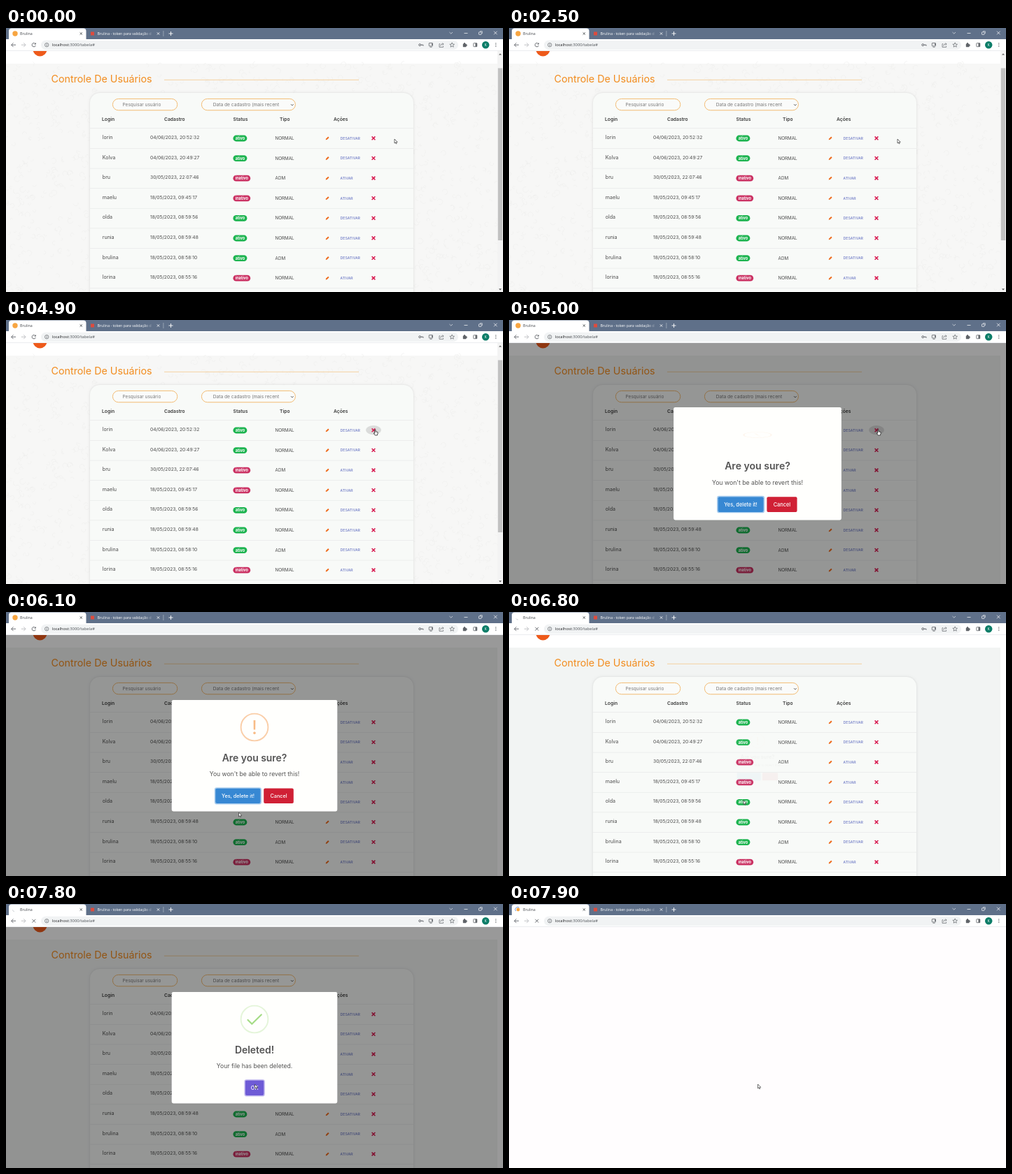
Write an HTML page with a canvas that moves like this. It is 710 px wide and 378 px high and loops after 8 s.

```html
<!DOCTYPE html>
<html lang="pt">
<head>
<meta charset="utf-8">
<title>Controle De Usuários</title>
<style>
html, body { margin: 0; width: 100%; height: 100%; overflow: hidden; background: #fff; }
canvas { display: block; width: 710px; height: 378px; }
</style>
</head>
<body>
<canvas id="stage"></canvas>
<script>
const W = 710, H = 378, LOOP = 8000;
const canvas = document.getElementById('stage');
const ratio = window.devicePixelRatio || 1;
canvas.width = W * ratio;
canvas.height = H * ratio;
const c = canvas.getContext('2d');

const UI = 'Inter, "Open Sans", sans-serif';
const SYS = '"Open Sans", "Noto Sans", sans-serif';
const ORANGE = '#f28c1e';

// Timeline in ms
const ASK_IN = 4918, ASK_OUT = 6690, DONE_IN = 6918, BLANK = 7850, LOADING = 6650;

const clamp = (v, a = 0, b = 1) => Math.min(b, Math.max(a, v));
const mix = (a, b, k) => a + (b - a) * k;
const smooth = k => k * k * (3 - 2 * k);

// CSS "ease": cubic-bezier(.25, .1, .25, 1)
function ease(x) {
  x = clamp(x);
  const bez = (a, b, s) => 3 * a * s * (1 - s) ** 2 + 3 * b * s * s * (1 - s) + s ** 3;
  let lo = 0, hi = 1;
  for (let i = 0; i < 20; i++) {
    const m = (lo + hi) / 2;
    if (bez(.25, .25, m) < x) lo = m; else hi = m;
  }
  return bez(.1, 1, lo);
}

// Interpolates stops of the form [time, ...values]
function track(stops, t, curve) {
  if (t <= stops[0][0]) return stops[0].slice(1);
  for (let i = 1; i < stops.length; i++) {
    const a = stops[i - 1], b = stops[i];
    if (t < b[0]) {
      const k = curve((t - a[0]) / (b[0] - a[0]));
      return a.slice(1).map((v, j) => mix(v, b[j + 1], k));
    }
  }
  return stops[stops.length - 1].slice(1);
}

function text(s, x, y, size, color, weight = 400, family = UI, align = 'left') {
  c.font = `${weight} ${size}px ${family}`;
  c.textAlign = align;
  c.fillStyle = color;
  c.fillText(s, x, y);
}

function rect(x, y, w, h, color) {
  c.fillStyle = color;
  c.fillRect(x, y, w, h);
}

function box(x, y, w, h, r, fill, line, lw = 1) {
  c.beginPath();
  c.roundRect(x, y, w, h, r);
  if (fill) { c.fillStyle = fill; c.fill(); }
  if (line) { c.strokeStyle = line; c.lineWidth = lw; c.stroke(); }
}

function disc(x, y, r, color) {
  c.beginPath();
  c.arc(x, y, r, 0, 7);
  c.fillStyle = color;
  c.fill();
}

function arc(x, y, r, a, b, color, lw) {
  c.beginPath();
  c.arc(x, y, r, a, b);
  c.strokeStyle = color;
  c.lineWidth = lw;
  c.stroke();
}

function poly(points, color, lw, fill) {
  c.beginPath();
  points.forEach(([x, y], i) => i ? c.lineTo(x, y) : c.moveTo(x, y));
  if (fill) { c.closePath(); c.fillStyle = fill; c.fill(); }
  if (color) { c.strokeStyle = color; c.lineWidth = lw; c.stroke(); }
}

function cross(x, y, r, color, lw) {
  poly([[x - r, y - r], [x + r, y + r]], color, lw);
  poly([[x + r, y - r], [x - r, y + r]], color, lw);
}

function star(x, y, r) {
  const pts = [];
  for (let i = 0; i <= 10; i++) {
    const a = -Math.PI / 2 + i * Math.PI / 5, q = i % 2 ? r * .45 : r;
    pts.push([x + q * Math.cos(a), y + q * Math.sin(a)]);
  }
  poly(pts, '#5f6368', .7);
}

function tabs(t) {
  rect(0, 0, W, 16, '#5f7089');
  box(4, .5, 110.5, 18, [4, 4, 0, 0], '#fff');
  if (t < LOADING) disc(13, 8, 3.7, '#f7a541');
  else if (t < BLANK) arc(12.5, 8, 3, t / 150, t / 150 + 1.3, '#c3c7cc', .8);
  else {
    disc(13, 8, 2.4, '#f7a541');
    arc(12.5, 8, 3.6, 1.6 + t / 400, 4.4 + t / 400, '#4c7fd6', .8);
  }
  text('Brulina', 20, 10, 5.3, '#45484d', 400, SYS);
  cross(107.3, 8, 1.7, '#3c4043', .8);
  rect(121, 5.5, 5, 5, '#dd4b3e');
  const fade = c.createLinearGradient(198, 0, 212, 0);
  fade.addColorStop(0, '#fff');
  fade.addColorStop(1, 'rgba(255,255,255,0)');
  text('Brulina - token para validação d', 130.5, 10, 5.25, fade, 400, SYS);
  cross(217.5, 8, 1.7, '#fff', .8);
  rect(224.5, 4, .8, 8, '#a3aebd');
  poly([[232.5, 8], [238.5, 8]], '#fff', .9);
  poly([[235.5, 5], [235.5, 11]], '#fff', .9);
  poly([[633.5, 6], [635.8, 8.2], [638, 6]], '#e8ebf0', .7);
  poly([[654.5, 7.5], [659.5, 7.5]], '#fff', .7);
  box(675.5, 5.8, 3.6, 3.6, .6, null, '#fff', .7);
  poly([[677, 4.7], [680.3, 4.7], [680.3, 8]], '#fff', .6);
  cross(699.3, 7, 2.3, '#fff', .7);
}

function toolbar(t) {
  const ink = '#5f6368';
  rect(0, 16, W, 17, '#fff');
  box(50, 17.7, 596, 13.2, 6.6, '#f1f3f4');
  poly([[14, 24.2], [7.6, 24.2]], ink, .9);
  poly([[10.5, 21.3], [7.6, 24.2], [10.5, 27.1]], ink, .9);
  poly([[21.8, 24.2], [28, 24.2]], '#babcc0', .9);
  poly([[25.2, 21.3], [28, 24.2], [25.2, 27.1]], '#babcc0', .9);
  if (t < LOADING) {
    arc(39.8, 24.2, 2.7, .3, 5.5, ink, .9);
    poly([[42.8, 21], [42.8, 23.6], [40.2, 23.6]], null, 0, ink);
  } else cross(39.8, 24.2, 2.4, ink, .9);
  arc(58.2, 24.2, 2.7, 0, 7, ink, .7);
  rect(57.8, 23.7, .8, 2, ink);
  rect(57.8, 22.5, .8, .8, ink);
  text('localhost', 65.7, 26.4, 5.75, '#202124', 400, SYS);
  const x = 65.7 + c.measureText('localhost').width;
  text(':3000/tabela#', x, 26.4, 5.75, '#4d5156', 400, SYS);
  if (t < BLANK) {
    arc(591.2, 24.2, 1.4, 0, 7, ink, 1);
    poly([[592.6, 24.2], [596, 24.2], [596, 25.6]], ink, 1);
  }
  box(604.3, 21.5, 5.2, 4.4, .5, null, ink, .8);
  rect(605.5, 26.8, 3, .8, ink);
  poly([[608, 22], [608, 25], [609.8, 23.6]], null, 0, ink);
  poly([[620.2, 22.7], [619, 22.7], [619, 27.4], [624.6, 27.4], [624.6, 25.7]], ink, .7);
  poly([[620.6, 25.7], [622, 23], [625, 23]], ink, .7);
  poly([[623.6, 21.4], [625.2, 23], [623.6, 24.6]], ink, .7);
  star(637.2, 24.4, 3.5);
  box(652.8, 22.4, 4.8, 4.8, .6, ink);
  disc(655, 22.2, 1.1, ink);
  disc(657.8, 24.7, 1.1, ink);
  box(667.8, 21.7, 5, 5, .5, null, ink, .8);
  rect(670.5, 21.7, 2.3, 5, ink);
  disc(685.2, 24.2, 5.2, '#0c7d68');
  text('K', 685.2, 26.2, 5.2, '#fff', 400, SYS, 'center');
  for (let i = -1; i < 2; i++) disc(699.8, 24.2 + i * 2.2, .65, ink);
  rect(0, 32.3, W, .7, '#e3e5e8');
}

// Faint doodle wallpaper
const doodles = (() => {
  let seed = 7;
  const rnd = () => (seed = seed * 16807 % 2147483647) / 2147483647;
  return Array.from({ length: 1500 }, () =>
    [rnd() * 702, 51 + rnd() * 327, 1.5 + rnd() * 2.5, rnd() * 6, 2 + rnd() * 3]);
})();

function wallpaper() {
  rect(0, 51, 702, H - 51, '#f7f7f6');
  c.beginPath();
  for (const [x, y, r, a, len] of doodles) {
    c.moveTo(x + r * Math.cos(a), y + r * Math.sin(a));
    c.arc(x, y, r, a, a + len);
  }
  c.strokeStyle = '#efefee';
  c.lineWidth = .7;
  c.stroke();
}

const rows = [
  ['lorin', '04/06/2023, 20:52:32', 1, 'NORMAL'],
  ['Kolva', '04/06/2023, 20:49:27', 1, 'NORMAL'],
  ['bru', '30/05/2023, 22:07:46', 0, 'ADM'],
  ['maelu', '18/05/2023, 09:45:17', 0, 'NORMAL'],
  ['olda', '18/05/2023, 08:59:56', 1, 'NORMAL'],
  ['runia', '18/05/2023, 08:59:48', 1, 'NORMAL'],
  ['brulina', '18/05/2023, 08:58:10', 1, 'ADM'],
  ['lorina', '18/05/2023, 08:55:16', 0, 'NORMAL']
];

function row([name, date, on, kind], i) {
  const y = 157.8 + i * 28.6;
  text(name, 137.8, y + 1.2, 7.1, '#4a4a4a');
  text(date, 206, y + 1.1, 6.7, '#4a4a4a');
  box(324.4, y - 4.2, on ? 20 : 24.8, 8.8, 4.4, on ? '#1db450' : '#cb3364');
  text(on ? 'ativo' : 'inativo', on ? 334.4 : 336.8, y + 2.1, 5.5, '#fff', 700, UI, 'center');
  text(kind, 384.6, y + 2.2, 6.25, '#4a4a4a');
  poly([[456.7, y + 2.5], [457.2, y + .6], [460.2, y - 2.3], [461.6, y - .9], [458.6, y + 2]], null, 0, '#ee6a1c');
  text(on ? 'DESATIVAR' : 'ATIVAR', 477.6, y + 2, 5.2, '#5765bd');
  cross(525, y, 2.4, '#d81b50', 1.5);
  rect(120, y + 14.3, 462, .7, '#e7e9e8');
}

function page(t) {
  const plain = t >= ASK_IN;
  rect(0, 33, W, H - 33, '#fff');
  c.save();
  c.beginPath();
  c.rect(0, 33, W, H - 33);
  c.clip();
  if (plain) rect(0, 51, 702, H - 51, '#f2f4f3'); else wallpaper();
  disc(48.5, 30.5, 10, '#ee5a1b');
  text('Controle De Usuários', 64.5, 78, 14.3, ORANGE);
  rect(226, 73.8, 278, .9, '#f6cd98');

  c.shadowColor = 'rgba(0,0,0,.12)';
  c.shadowBlur = 3.5 * ratio;
  box(120, 93, 462, 320, 14, '#f8faf8');
  c.shadowColor = 'transparent';

  box(152.4, 101.4, 92.4, 16.4, 8.2, '#fafbfa', '#f2b566', .9);
  text('Pesquisar usuário', 166.5, 111.9, 6.5, '#7b7b7b');
  box(279.4, 101.4, 134, 16.4, 8.2, '#fafbfa', '#f2b566', .9);
  text('Data de cadastro (mais recent', 295.7, 111.9, 6.65, '#777');
  poly([[407, 109.2], [408.8, 111], [410.6, 109.2]], '#444', .9);

  [['Login', 137], ['Cadastro', 226], ['Status', 324.5], ['Tipo', 391], ['Ações', 468]]
    .forEach(([s, x]) => text(s, x, 132.8, 6.75, '#3a3a3a', 600));
  rect(120, 143.2, 462, .7, '#e7e9e8');

  const press = clamp((t - 4650) / 200) * clamp((5600 - t) / 150);
  if (press > 0) {
    c.beginPath();
    c.ellipse(525, 157.6, 11 * mix(.6, 1, press), 6.6 * mix(.6, 1, press), 0, 0, 7);
    c.fillStyle = `rgba(40,40,40,${.14 * press})`;
    c.fill();
  }
  rows.forEach(row);

  if (!plain) {
    rect(702, 33, 8, H - 33, '#f3f3f3');
    rect(702.8, 57.5, 6.4, 246.5, '#c1c1c1');
    poly([[704, 38.6], [706, 36.4], [708, 38.6]], null, 0, '#555');
    poly([[704, 373.2], [706, 375.4], [708, 373.2]], null, 0, '#555');
  }
  c.restore();
}

function button(s, x, w, fill, ring) {
  if (ring) box(x - .7, 251.9, w + 1.4, 22.8, 2.4, null, ring, 1.4);
  box(x, 252.6, w, 21.4, 1.9, fill);
  text(s, x + w / 2, 266, 7.3, '#fff', 500, UI, 'center');
}

function warning(age) {
  const k = ease(age / 500);
  const [turn, seen] = track([[0, 45, 0], [125, -25, .4], [250, 15, .8], [375, -5, 1], [500, 0, 1]], age, ease);
  c.save();
  c.translate(355, 165);
  c.scale(1, Math.abs(Math.cos(mix(100, 0, k) * Math.PI / 180)));
  c.globalAlpha *= k;
  arc(0, 0, 19.4, 0, 7, '#facea8', 1.9);
  c.rotate(turn * Math.PI / 180);
  c.globalAlpha *= seen;
  text('!', 0, 10, 27.7, '#f8bb86', 400, UI, 'center');
  c.restore();
}

function success(age) {
  arc(355, 165, 19.4, 0, 7, 'rgba(165,220,134,.3)', 1.9);
  const k = clamp((age - 300) / 350);
  if (!k) return;
  const a = [345.5, 166], b = [351.3, 171.8], d = [364.8, 158.5];
  const part = (p, q, u) => [mix(p[0], q[0], u), mix(p[1], q[1], u)];
  const line = [a, part(a, b, clamp(k / .35))];
  if (k > .35) line.push(part(b, d, (k - .35) / .65));
  c.lineCap = 'round';
  poly(line, '#a5dc86', 2.2);
  c.lineCap = 'butt';
}

function dialog(t, start, end, done) {
  if (t < start || t > end + 150) return;
  const age = t - start;
  const out = ease((t - end) / 150);
  const shade = clamp(age / 80) * (1 - clamp((t - end) / 100));
  rect(0, 33, W, H - 33, `rgba(0,0,0,${.4 * shade})`);
  const [grow] = track([[0, .7], [135, 1.05], [240, .95], [300, 1]], age, ease);
  const size = t > end ? mix(1, .5, out) : grow;
  c.save();
  c.globalAlpha = 1 - out;
  c.translate(355, 205.8);
  c.scale(size, size);
  c.translate(-355, -205.8);
  box(236.7, 126, 236.6, 159.5, 2.4, '#fffffd');
  if (done) success(age); else warning(age);
  text(done ? 'Deleted!' : 'Are you sure?', 355, 213.7, 13.9, '#545454', 600, UI, 'center');
  text(done ? 'Your file has been deleted.' : "You won't be able to revert this!",
    355, 235.4, 8.6, '#545454', 400, UI, 'center');
  if (done) button('OK', 341.8, 26.6, '#6e5bd6', '#bdb4ee');
  else {
    button('Yes, delete it!', 299.2, 64.4, '#3788d3', '#a5cbee');
    button('Cancel', 368.2, 42.6, '#d02035');
  }
  c.restore();
}

const path = [
  [3200, 555, 159], [3400, 545.5, 159.5], [3500, 545.5, 159.5], [3900, 529, 157],
  [4600, 529, 157], [4700, 527, 157], [5550, 527, 157], [6080, 332.5, 287],
  [6150, 332.5, 287], [6450, 334.8, 269.5], [7250, 334.8, 269.5], [7800, 355.5, 258]
];

function cursor(t) {
  const [x, y] = track(path, t, smooth);
  const onButton = t > 3650 && t < 5650 || t > 6330 && t < ASK_OUT;
  c.save();
  c.translate(x, y);
  c.lineJoin = 'round';
  if (onButton) {
    poly([[-.2, 0], [.9, 0], [1, 2.8], [3.9, 3.4], [4.1, 5.2], [3.4, 8], [.2, 8], [-1.8, 5], [-1.2, 4.4], [-.2, 5.2], [-.2, 0]],
      '#222', .8, '#fff');
  } else {
    poly([[0, 0], [0, 6], [1.4, 4.8], [2.3, 6.8], [3.2, 6.4], [2.4, 4.5], [4.2, 4.3], [0, 0]], '#333', .7, '#fff');
  }
  c.restore();
}

function draw(t) {
  c.setTransform(ratio, 0, 0, ratio, 0, 0);
  c.globalAlpha = 1;
  if (t < BLANK) {
    page(t);
    dialog(t, ASK_IN, ASK_OUT, false);
    dialog(t, DONE_IN, BLANK, true);
  } else rect(0, 33, W, H - 33, '#fffdfe');
  tabs(t);
  toolbar(t);
  cursor(t);
}

function tick() {
  draw(performance.now() % LOOP);
  requestAnimationFrame(tick);
}
tick();
</script>
</body>
</html>
```
